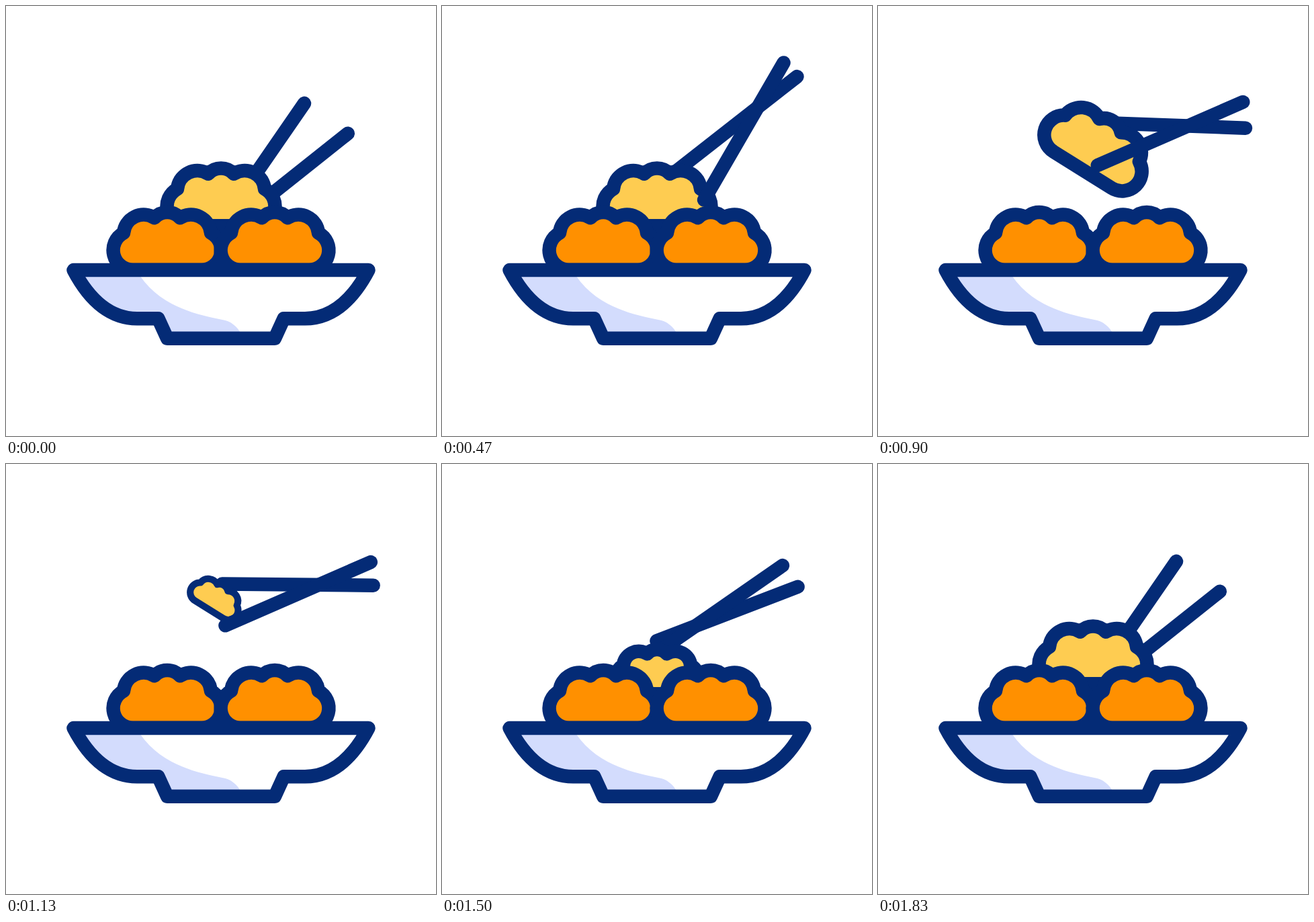
These frames come from a looping animation (640x640 px, 2 s). An HTML page:

```html
<!DOCTYPE html>
<html lang="en">
<head>
<meta charset="utf-8">
<title>Dumplings</title>
<style>
  html, body { margin: 0; width: 100%; height: 100%; overflow: hidden; background: #fff; }
  svg { display: block; width: 100vw; height: 100vh; }
  .line { stroke: #042b76; stroke-width: 20.5; stroke-linecap: round; stroke-linejoin: round; }
  .spark { stroke: #fecc51; stroke-width: 20.5; stroke-linecap: round; }
</style>
</head>
<body>
<svg viewBox="0 0 640 640">
  <defs>
    <path id="dumpling" d="M-51 0A29.3 29.3 0 0 1 -65 -55.1A30 30 0 0 1 -19 -77.5A26 26 0 0 1 19 -77.5A30 30 0 0 1 65 -55.1A29.3 29.3 0 0 1 51 0Z"/>
  </defs>
  <line id="backStick" class="line" x1="-67.5" x2="157.5"/>
  <line id="frontStickUnder" class="line" x1="-118" x2="118"/>
  <use id="top" href="#dumpling" class="line" fill="#fecc51"/>
  <line id="frontStickOver" class="line" x1="-118" x2="118"/>
  <use href="#dumpling" class="line" fill="#ff9000" transform="translate(240 392.8)"/>
  <use href="#dumpling" class="line" fill="#ff9000" transform="translate(400 392.8)"/>
  <path id="bowl" fill="#fff" d="M100.5 393H539.5C519 432 490 465 445 465.3H413.5L400 494.8H240L226.5 465.3H195C150 465 121 432 100.5 393Z"/>
  <path fill="#d3dcfd" d="M101 393H194C220 437 262 456 322 467C335 469 344 477 350 488L349 495H240L226.5 465H195C150 465 121 432 101 393Z"/>
  <use href="#bowl" class="line" style="fill-opacity:0"/>
  <g id="sparks"></g>
</svg>
<script>
const LOOP = 2000, STROKE = 20.5;
const $ = id => document.getElementById(id);
const clamp = x => Math.min(1, Math.max(0, x));
const span = (t, a, b) => clamp((t - a) / (b - a));
const easeInOut = x => (1 - Math.cos(Math.PI * x)) / 2;
const easeOut = x => 1 - (1 - x) ** 2.5;
const mix = (a, b, k) => a + (b - a) * k;

// The front stick sets the pair's place and angle; the back stick is hinged
// beside it at a signed gap and turned by the spread.
const rest = { x: 377, y: 242, angle: 55.4, spread: 16.9, gap: 33 };
const out = { x: 484, y: 173, angle: 50.5, spread: 16, gap: -31 };
const grip = { x: 427, y: 195.2, angle: 65.9, spread: 25.6, gap: -31 };
const lifted = { ...grip, x: 435, y: 190, angle: 23.5 };
const empty = { x: 433, y: 206.5, angle: 23.7, spread: 17.8, gap: -31 };
const insert = { x: 387.5, y: 230, angle: 45.6, spread: 9.9, gap: 33 };

const moves = [
  { from: 0, to: 300, pose: out },
  { from: 300, to: 600, pose: grip },
  { from: 600, to: 900, pose: lifted },
  { from: 1033, to: 1370, pose: empty },
  { from: 1370, to: 1630, pose: insert },
  { from: 1630, to: 1833, pose: rest }
];

function pairPose(t) {
  const pose = { ...rest };
  for (const move of moves) {
    const k = easeInOut(span(t, move.from, move.to));
    for (const key in pose) pose[key] = mix(pose[key], move.pose[key], k);
  }
  return pose;
}

function placeSticks(t) {
  const { x, y, angle, spread, gap } = pairPose(t);
  const pair = `translate(${x} ${y}) rotate(${-angle})`;
  const hinge = -34.5 + 0.05 * gap;
  const over = t > 250 && t < 1300;
  $("backStick").setAttribute("transform", `${pair} translate(${hinge} ${gap}) rotate(${spread})`);
  $("frontStickUnder").setAttribute("transform", pair);
  $("frontStickOver").setAttribute("transform", pair);
  $("frontStickUnder").style.display = over ? "none" : "";
  $("frontStickOver").style.display = over ? "" : "none";
}

function placeTop(t) {
  const top = $("top");
  let scale, width = STROKE, transform;
  if (t < 1233) {
    const lift = easeInOut(span(t, 567, 900));
    const bite = easeInOut(span(t, 1040, 1220));
    scale = 1 - bite;
    const x = mix(320, 300, bite), y = mix(mix(298, 219, lift), 190, bite);
    transform = `translate(${x} ${y}) rotate(${32 * lift}) scale(${scale}) translate(0 29.3)`;
  } else {
    // The next dumpling grows out of the bowl with an outline of constant width.
    scale = easeOut(span(t, 1233, 1833));
    width = STROKE / Math.max(scale, 0.01);
    transform = `translate(320 393) scale(${scale}) translate(0 -65.7)`;
  }
  top.style.display = scale > 0.01 ? "" : "none";
  top.style.strokeWidth = width;
  top.setAttribute("transform", transform);
}

const sparks = [0, 1, 2].map(i => {
  const line = document.createElementNS("http://www.w3.org/2000/svg", "line");
  line.setAttribute("class", "spark");
  line.setAttribute("transform", `translate(280 146) rotate(${45 * i - 169})`);
  $("sparks").append(line);
  return { line, reach: 76 + 3 * i, end: 1375 + 45 * i };
});

function placeSpark({ line, reach, end }, t) {
  const outer = mix(40, reach, easeInOut(span(t, 1150, 1310)));
  const inner = mix(40, reach, easeInOut(span(t, end - 190, end)));
  line.style.display = t > 1150 && t < end ? "" : "none";
  line.setAttribute("x1", Math.min(inner, outer - 0.1));
  line.setAttribute("x2", outer);
}

function draw(t) {
  placeSticks(t);
  placeTop(t);
  sparks.forEach(spark => placeSpark(spark, t));
}

const begin = performance.now();
function tick() {
  draw((performance.now() - begin) % LOOP);
  requestAnimationFrame(tick);
}
tick();
</script>
</body>
</html>
```
